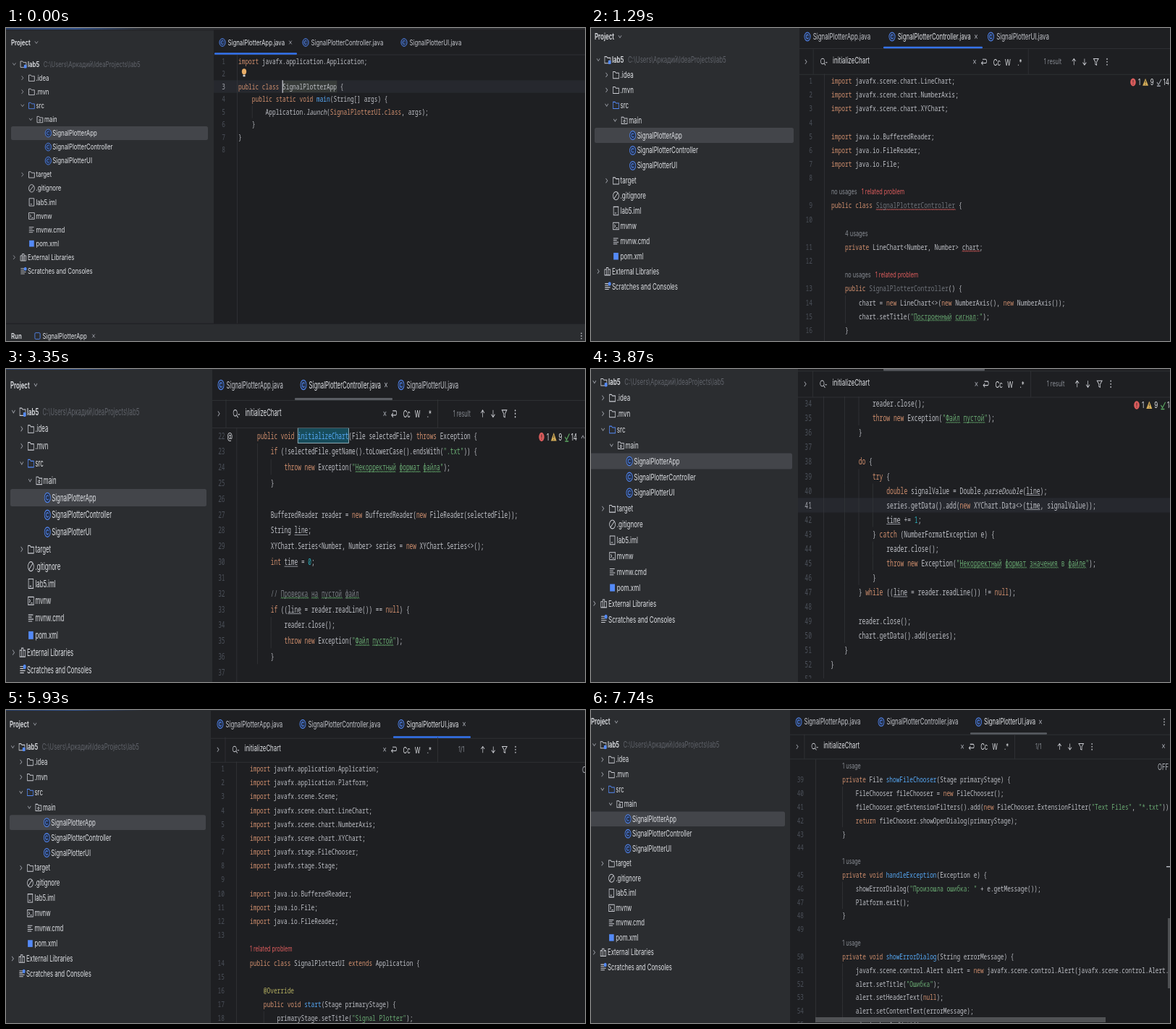
An HTML page that plays this animation: 800x433 px, repeating every 8 s.

```html
<!DOCTYPE html>
<html lang="en">
<head>
<meta charset="utf-8">
<title>Signal plotter project</title>
<style>
html, body { margin: 0; width: 100%; height: 100%; overflow: hidden; background: #1e1f22; }
svg { display: block; width: 100%; height: 100%; }
text { font: 13px Inter, sans-serif; white-space: pre; fill: #dfe1e5; }
.mono { font-family: "Noto Sans Mono", monospace; fill: #bcbec4; }
.bold { font-weight: 600; }
.small { font-size: 12px; }
.com { fill: #7a7e85; }
.str { fill: #6aab73; }
.ann { fill: #b3ae60; }
.key { fill: #cf8e6d; }
.num { fill: #2aacb8; }
.def { fill: #56a8f5; }
.dead { fill: #6f737a; }
.ital { font-style: italic; }
path, .line { fill: none; stroke: #ced0d6; stroke-width: 1.2; }
path.blue, .line.blue { stroke: #548af7; }
path.dim { stroke: #9da0a8; }
.scene { animation: show 8s step-end infinite; }
.scene:first-child { animation: none; }
@keyframes show { 0% { opacity: 1 } 16.125%, 100% { opacity: 0 } }
</style>
</head>
<body>
<svg id="stage" viewBox="0 0 800 433" preserveAspectRatio="none">
<defs><linearGradient id="glow">
<stop offset="0" stop-color="#2a3f68"/><stop offset=".5" stop-color="#35548c"/><stop offset="1" stop-color="#2b2d30"/>
</linearGradient></defs>
<g id="scenes"></g>
</svg>
<script>
const PANEL = '#2b2d30', EDITOR = '#1e1f22', RULE = '#35373b', BLUE = '#3574f0';

// s: scale, tree/head/tabs/find/badge: positions in px, col/num: text column and gutter edge
const scenes = [
  { s: [.6026, .7955], split: 287, tree: [30, 50], sel: [7, 279], head: [7, 20], strip: 2.5,
    tabs: { y: 20, x: [299, 414, 550], on: 0, line: [288, 402, 35.5], close: 393, blue: 1 },
    col: 321, num: 303, top: 46, first: 1, now: 3, caret: [3, 13], run: 409,
    marks: [[/SignalPlotterApp/g, 'same']],
    code: `import javafx.application.Application;

public class SignalPlotterApp {
    public static void main(String[] args) {
        Application.launch(SignalPlotterUI.class, args);
    }
}
` },
  { s: [.61, .871], split: 288, tree: [29, 44], sel: [5, 280], head: [5, 12],
    tabs: { y: 12, x: [299, 416, 552.5], on: 1, line: [404, 541, 27], close: 532, blue: 1 },
    find: [297, 46, '1 result'], badge: [749, 75, '#9da0a8'],
    col: 332, num: 306, top: 73, first: 1,
    marks: [[/[А-я]{2,}/g, 'typo'], [/(?<=class )\w+/g, 'error'], [/chart(?=;)/g, 'error']],
    code: `import javafx.scene.chart.LineChart;
import javafx.scene.chart.NumberAxis;
import javafx.scene.chart.XYChart;

import java.io.BufferedReader;
import java.io.FileReader;
import java.io.File;

»no usages|1 related problem
public class SignalPlotterController {

    »4 usages
    private LineChart<Number, Number> chart;

    »no usages|1 related problem
    public SignalPlotterController() {
        chart = new LineChart<>(new NumberAxis(), new NumberAxis());
        chart.setTitle("Построенный сигнал:");
    }` },
  { s: [.6006, .9915], split: 285, tree: [29, 59], sel: [6, 277], head: [6, 22], strip: 1,
    tabs: { y: 22, x: [297, 411, 546], on: 1, line: [399, 534, 41.5], close: 525 },
    find: [294, 61, '1 result'], badge: [740, 94, '#5fad65'],
    col: 328.3, num: 302.5, top: 92, first: 22, at: 310,
    marks: [[/[А-я]{2,}/g, 'typo'], [/\b(line|time)\b/g, 'under'], [/initializeChart/g, 'found']],
    code: `    public void initializeChart(File selectedFile) throws Exception {
        if (!selectedFile.getName().toLowerCase().endsWith(".txt")) {
            throw new Exception("Некорректный формат файла");
        }

        BufferedReader reader = new BufferedReader(new FileReader(selectedFile));
        String line;
        XYChart.Series<Number, Number> series = new XYChart.Series<>();
        int time = 0;

        // Проверка на пустой файл
        if ((line = reader.readLine()) == null) {
            reader.close();
            throw new Exception("Файл пустой");
        }
` },
  { s: [.619, .912], split: 286, tree: [24, 18], sel: [-6, 278],
    tabs: { y: -20, x: [], line: [404, 544, 1.2] },
    find: [296, 20, '1 result'], badge: [754, 50, '#5fad65'],
    col: 331, num: 305, top: 48, first: 34, now: 41, cut: 428,
    marks: [[/[А-я]{2,}/g, 'typo'], [/\b(line|time)\b/g, 'under']],
    code: `            reader.close();
            throw new Exception("Файл пустой");
        }

        do {
            try {
                double signalValue = Double.parseDouble(line);
                series.getData().add(new XYChart.Data<>(time, signalValue));
                time += 1;
            } catch (NumberFormatException e) {
                reader.close();
                throw new Exception("Некорректный формат значения в файле");
            }
        } while ((line = reader.readLine()) != null);

        reader.close();
        chart.getData().add(series);
    }
}
` },
  { s: [.6026, .872], split: 283, tree: [28, 51], sel: [5, 276], head: [5, 19.5], strip: 1,
    tabs: { y: 19.5, x: [296, 410, 546], on: 2, line: [535, 642, 37.5], close: 633, blue: 1 },
    find: [293, 54, '1/1'], off: [796, 83],
    col: 337, num: 302, top: 81, first: 1,
    code: `import javafx.application.Application;
import javafx.application.Platform;
import javafx.scene.Scene;
import javafx.scene.chart.LineChart;
import javafx.scene.chart.NumberAxis;
import javafx.scene.chart.XYChart;
import javafx.stage.FileChooser;
import javafx.stage.Stage;

import java.io.BufferedReader;
import java.io.File;
import java.io.FileReader;

»1 related problem
public class SignalPlotterUI extends Application {

    @Override
    public void start(Stage primaryStage) {
        primaryStage.setTitle("Signal Plotter");` },
  { s: [.6065, .8665], split: 279, tree: [22, 41], sel: [-6, 271], head: [-1, 9.5],
    tabs: { y: 9.5, x: [291, 406, 542], on: 2, line: [531, 639, 26], close: 630, blue: 1 },
    find: [288, 43, '1/1'], off: [794, 72],
    col: 332, num: 298, top: 71, first: 21, now: 33, hbar: [314, 721, 423],
    marks: [[/initializeChart/g, 'found'], [/(?<=Exception e\) )\{/g, 'brace'], [/(?<=^ {12})\}$/g, 'brace']],
    code: `
        if (selectedFile != null) {
            try {
                SignalPlotterController controller = new SignalPlotterController();
                controller.initializeChart(selectedFile);

                Scene scene = new Scene(controller.getChart(), 800, 600);
                primaryStage.setScene(scene);

                primaryStage.show();
            } catch (Exception e) {
                handleException(e);
            }
        } else {
            Platform.exit();
        }
    }

    »1 usage
    private File showFileChooser(Stage primaryStage) {` },
  { s: [.597, .8555], split: 275, tree: [23, 48], sel: [-6, 268], head: [0, 16.5],
    tabs: { y: 16.5, x: [287, 401, 535.5], on: 2, line: [524, 630, 32.5], close: 621, more: 792 },
    find: [285, 50, '1/1', 791], off: [783, 79],
    col: 328.6, num: 294, top: 77.5, first: 39, hbar: [310, 711, 425], vbar: [288, 385, 216],
    code: `    »1 usage
    private File showFileChooser(Stage primaryStage) {
        FileChooser fileChooser = new FileChooser();
        fileChooser.getExtensionFilters().add(new FileChooser.ExtensionFilter("Text Files", "*.txt"));
        return fileChooser.showOpenDialog(primaryStage);
    }

    »1 usage
    private void handleException(Exception e) {
        showErrorDialog("Произошла ошибка: " + e.getMessage());
        Platform.exit();
    }

    »1 usage
    private void showErrorDialog(String errorMessage) {
        javafx.scene.control.Alert alert = new javafx.scene.control.Alert(javafx.scene.control.Alert.AlertType.ERROR);
        alert.setTitle("Ошибка");
        alert.setHeaderText(null);
        alert.setContentText(errorMessage);
        alert.showAndWait();` }
];

// name, depth, icon, arrow
const files = [
  ['lab5', 0, 'module', 'open'], ['.idea', 1, 'folder', 'shut'], ['.mvn', 1, 'folder', 'shut'],
  ['src', 1, 'source', 'open'], ['main', 2, 'package', 'open'], ['SignalPlotterApp', 3, 'class'],
  ['SignalPlotterController', 3, 'class'], ['SignalPlotterUI', 3, 'class'], ['target', 1, 'folder', 'shut'],
  ['.gitignore', 1, 'ignore'], ['lab5.iml', 1, 'file'], ['mvnw', 1, 'shell'], ['mvnw.cmd', 1, 'lines'],
  ['pom.xml', 1, 'square'], ['External Libraries', 0, 'books', 'shut'], ['Scratches and Consoles', 0, 'scratch']
];

const p = (d, cls = '') => `<path class="${cls}" d="${d}"/>`;
const FOLDER = 'M-6.5 -5H-2L0 -3H6.5V5.5H-6.5Z', LINES = 'M-6 -4.5H5M-6 -1.5H2M-6 1.5H6M-6 4.5H3';
const icons = {
  open: p('M-3.5 -2L0 1.8L3.5 -2', 'dim'),
  shut: p('M-2 -3.5L1.8 0L-2 3.5', 'dim'),
  up: p('M-3.5 2L0 -1.8L3.5 2', 'dim'),
  folder: p(FOLDER),
  source: p(FOLDER, 'blue'),
  module: p(FOLDER) + '<rect x="1.5" y="1" width="6" height="6" rx="1.5" fill="#548af7"/>',
  package: p(FOLDER) + '<circle class="line" cy="1.5" r="1.8"/>',
  class: '<circle class="line blue" r="6.8" style="fill:#25324d"/>' + p('M2.4 -1.8A3 3 0 1 0 2.4 1.8', 'blue'),
  ignore: '<circle class="line" r="6.5"/>' + p('M-4.5 4.5L4.5 -4.5'),
  file: p('M-5.5 -6.5H5.5V6.5H-5.5ZM-3 3.5H1'),
  shell: p('M-6.5 -5.5H6.5V5.5H-6.5ZM-4 -2.5L-1.5 0L-4 2.5M0 3H4'),
  lines: p(LINES),
  square: '<rect x="-5.5" y="-5.5" width="11" height="11" fill="#548af7"/>',
  books: p('M-6.5 -3H-2.5V6H-6.5ZM-2.5 -6H1.5V6H-2.5ZM1.5 -3H6V6H1.5Z'),
  scratch: p(LINES) + '<circle cx="4.5" cy="-4" r="3.2" fill="#548af7"/>',
  close: p('M-3 -3L3 3M3 -3L-3 3', 'dim'),
  lens: '<circle class="line" cx="-1.5" cy="-1" r="4.3"/>' + p('M1.8 2.2L5 5.5M5 1H9'),
  wrap: p('M-3 -4H4Q6 -4 6 -1Q6 2 4 2H-5M-2 -1L-5.5 2L-2 5'),
  rise: p('M0 5V-5M-4 -1L0 -5L4 -1'),
  fall: p('M0 -5V5M-4 1L0 5L4 1'),
  sieve: p('M-5.5 -5H5.5L1.5 0V5L-1.5 4V0Z'),
  more: [-4.5, 0, 4.5].map(y => `<circle cy="${y}" r="1.2" fill="#ced0d6"/>`).join(''),
  bulb: '<circle cy="-1.5" r="5.2" fill="#e8ad67"/><rect x="-2.5" y="4.2" width="5" height="3" fill="#ced0d6"/>',
  fault: '<circle r="6.2" fill="#db5c5c"/><path d="M0 -3.5V1M0 2.3V3.6" style="stroke:#1e1f22"/>',
  warn: '<path d="M0 -6L6.5 5.5H-6.5Z" style="fill:#d6ae58;stroke:none"/><path d="M0 -2.5V1.5M0 3V4.2" style="stroke:#1e1f22"/>'
};

const words = 'import|public|private|class|static|void|new|if|else|throws?|int|double|do|while|try|catch|null|return|extends';
const grammar = new RegExp('(?<com>//.*)|(?<str>"[^"]*")|(?<ann>@\\w+)' +
  '|(?<dead>(?<=public (?:class )?)SignalPlotterController)' +
  `|(?<key>\\b(?:${words})\\b|SignalPlotterUI(?=\\.class))|(?<num>\\b\\d+\\b)` +
  '|(?<def>(?<=\\b(?:void|File) )\\w+(?=\\())|(?<ital>\\b(?:launch|parseDouble)\\b)', 'g');
const esc = t => t.replace(/&/g, '&amp;').replace(/</g, '&lt;').replace(/>/g, '&gt;');
const paint = line => esc(line).replace(grammar, (m, ...rest) => {
  const groups = rest.at(-1);
  return `<tspan class="${Object.keys(groups).find(k => groups[k])}">${m}</tspan>`;
});

const rect = (x, y, w, h, fill, more = '') =>
  `<rect x="${x}" y="${y}" width="${w}" height="${h}" fill="${fill}" ${more}/>`;

function draw(sc) {
  const [sx, sy] = sc.s, adv = 7.8 * sx, pitch = 22 * sy;
  const at = (x, y, body) => `<g transform="matrix(${sx} 0 0 ${sy} ${x} ${y})">${body}</g>`;
  const icon = (x, y, name) => at(x, y, icons[name]);
  const text = (x, y, body, cls = '', more = '') => at(x, y, `<text y="4.6" class="${cls}" ${more}>${body}</text>`);
  const tone = c => `style="fill:${c}"`;

  function tree() {
    const [x0, y0] = sc.tree, step = 24 * sy;
    let out = rect(0, 0, sc.split, 433, PANEL);
    out += rect(sc.sel[0], y0 + 4.5 * step, sc.sel[1] - sc.sel[0], step, '#43454a', 'rx="2.5"');
    files.forEach(([name, depth, kind, arrow], i) => {
      const x = x0 + depth * 19 * sx, y = y0 + i * step;
      if (arrow) out += icon(x - 31 * sx, y, arrow);
      out += icon(x - 10 * sx, y, kind) + text(x, y, name, i ? '' : 'bold');
    });
    out += text(x0 + 36 * sx, y0, 'C:\\Users\\Аркадий\\IdeaProjects\\lab5', '', tone('#5f6269'));
    if (sc.head) {
      const [x, y] = sc.head;
      out += text(x, y, 'Project', 'bold') + icon(x + 35, y, 'open');
    }
    return out;
  }

  function tabs() {
    const t = sc.tabs, [a, b, y] = t.line, h = 3 * sy;
    let out = rect(sc.split, y + h / 2, 800, .7, RULE);
    t.x.forEach((x, i) => {
      const name = 'SignalPlotter' + ['App', 'Controller', 'UI'][i] + '.java';
      out += icon(x, t.y, 'class') + text(x + 12.5 * sx, t.y, name, '', tone(i === t.on ? '#dfe1e5' : '#c3c5cb'));
    });
    if (t.close) out += icon(t.close, t.y, 'close');
    if (t.more) out += icon(t.more, t.y, 'more');
    return out + rect(a, y - h / 2, b - a, h, t.blue ? BLUE : '#5a5d63', 'rx="1"');
  }

  function find() {
    const [x0, y, count, close] = sc.find, X = u => x0 + u * sx;
    const top = y - 19 * sy, bottom = y + 20.5 * sy;
    let out = rect(sc.split, bottom, 800, .7, RULE);
    for (const u of [16, 503]) out += rect(X(u), top, .7, bottom - top, RULE);
    [[0, 'shut'], [39.3, 'lens'], [382, 'close'], [403, 'wrap'], [607, 'rise'], [631, 'fall'], [657, 'sieve'], [682, 'more']]
      .forEach(([u, name]) => out += icon(X(u), y + .8, name));
    [[424, 'Cc'], [451, 'W'], [479, '.*']].forEach(([u, s]) => out += text(X(u), y + 1.5, s));
    out += text(X(60.7), y - 1, 'initializeChart');
    out += text(X(count === '1/1' ? 551 : 539), y, count, 'small', tone('#868a91'));
    return close ? out + icon(close, y, 'close') : out;
  }

  function badge() {
    const [x, y, tick] = sc.badge;
    let out = icon(x, y, 'fault') + icon(x + 28 * sx, y, 'warn') + icon(x + 95 * sx, y, 'up');
    out += at(x + 59 * sx, y, `<path d="M-5 0L-1.5 4L5 -4.5M-5 6H3" style="stroke:${tick};stroke-width:1.6"/>`);
    [[11.5, 1], [39, 9], [68, 14]].forEach(([u, n]) => out += text(x + u * sx, y, n));
    return out;
  }

  function mark(kind, x, y, n) {
    const w = n * adv, wave = c =>
      at(x, y + 6.5 * sy, `<path d="M0 1${'l2 -2l2 2'.repeat(Math.round(n * 1.95))}" style="stroke:${c};stroke-width:1"/>`);
    const box = (fill, more) => rect(x, y - pitch / 2 + .5, w, pitch - 1, fill, more);
    return {
      typo: () => wave('#5c9a63'),
      error: () => wave('#d65a5a'),
      under: () => rect(x, y + 6.2 * sy, w, .9, '#9da0a8'),
      found: () => box('#174c5b', 'stroke="#a9c4cc" stroke-width=".8"'),
      same: () => box('#373b39'),
      brace: () => box('#4b4e53')
    }[kind]();
  }

  function code() {
    const rows = sc.code.split('\n'), indent = i => rows[i].search(/\S/);
    let back = rect(sc.num + 16, sc.top - pitch / 2, .7, 433, RULE), front = '', n = sc.first;
    rows.forEach((row, i) => {
      const y = sc.top + i * pitch;
      let next = i;
      while (next < rows.length - 1 && indent(next) < 0) next++;
      const depth = indent(next), x = sc.col + depth * adv;
      for (let c = 4; c < depth; c += 4) back += rect(sc.col + c * adv, y - pitch / 2, .7, pitch, RULE);
      if (row.includes('»')) {
        const parts = row.trim().slice(1).split('|').map((s, k) =>
          `<tspan dx="${k * 10}" fill="${s.includes('problem') ? '#db5c5c' : '#868a91'}">${s}</tspan>`);
        front += text(x, y, parts.join(''), 'small');
        return;
      }
      const now = n === sc.now;
      if (now) back = rect(sc.split, y - pitch / 2, 800, pitch, '#26282e') + back;
      front += text(sc.num, y, n++, 'mono', `text-anchor="end" ${tone(now ? '#a1a3ab' : '#4b5059')}`);
      for (const [re, kind] of sc.marks || [])
        for (const m of row.matchAll(re)) back += mark(kind, sc.col + m.index * adv, y, m[0].length);
      if (row.trim()) front += text(x, y, paint(row.trim()), 'mono');
    });
    if (sc.caret) {
      const [line, c] = sc.caret, y = sc.top + (line - 1) * pitch;
      front += rect(sc.col + c * adv - .5, y - pitch / 2, 1.2, pitch, '#ced0d6') + icon(329, y - pitch - 2, 'bulb');
    }
    return back + front;
  }

  function extras() {
    let out = '';
    if (sc.at) out += text(sc.at - 4.5, sc.top, '@');
    if (sc.off) out += text(...sc.off, 'OFF', '', tone('#b4b8bf'));
    if (sc.strip) out += rect(0, 0, 800, sc.strip, PANEL) + rect(0, 0, 190, sc.strip, 'url(#glow)');
    if (sc.strip > 2) out += rect(0, sc.strip, 800, .9, EDITOR);
    if (sc.cut) out += rect(sc.split, sc.cut, 800, 9, EDITOR);
    if (sc.hbar) {
      const [a, b, y] = sc.hbar;
      out += rect(a, y, b - a, 7, '#5a5b5e', 'opacity=".85"');
    }
    if (sc.vbar) {
      const [a, b, y] = sc.vbar;
      out += rect(797, a, 3, b - a, '#4d4f52') + rect(795, y, 5, 1.5, '#b4b8bf');
    }
    if (sc.run) {
      const y = sc.run + 17;
      out += rect(0, sc.run, 800, 30, PANEL) + rect(0, sc.run - .5, 800, 1, EDITOR);
      out += text(7, y, 'Run', 'bold') + text(50.5, y, 'SignalPlotterApp') + icon(121, y, 'close') + icon(795, y, 'more');
      out += at(43.5, y, '<rect class="line blue" x="-6" y="-5.5" width="12" height="11" rx="2"/>');
    }
    return out;
  }

  return rect(0, 0, 800, 433, EDITOR) + code() + tree() + tabs() +
    (sc.find ? find() : '') + (sc.badge ? badge() : '') + extras();
}

// The last scene lies at the bottom and shows once all others are hidden.
document.getElementById('scenes').innerHTML = scenes.map((sc, i) =>
  `<g class="scene" style="animation-delay:${(i * 1.29 - 8).toFixed(2)}s">${draw(sc)}</g>`).reverse().join('');
</script>
</body>
</html>
```
